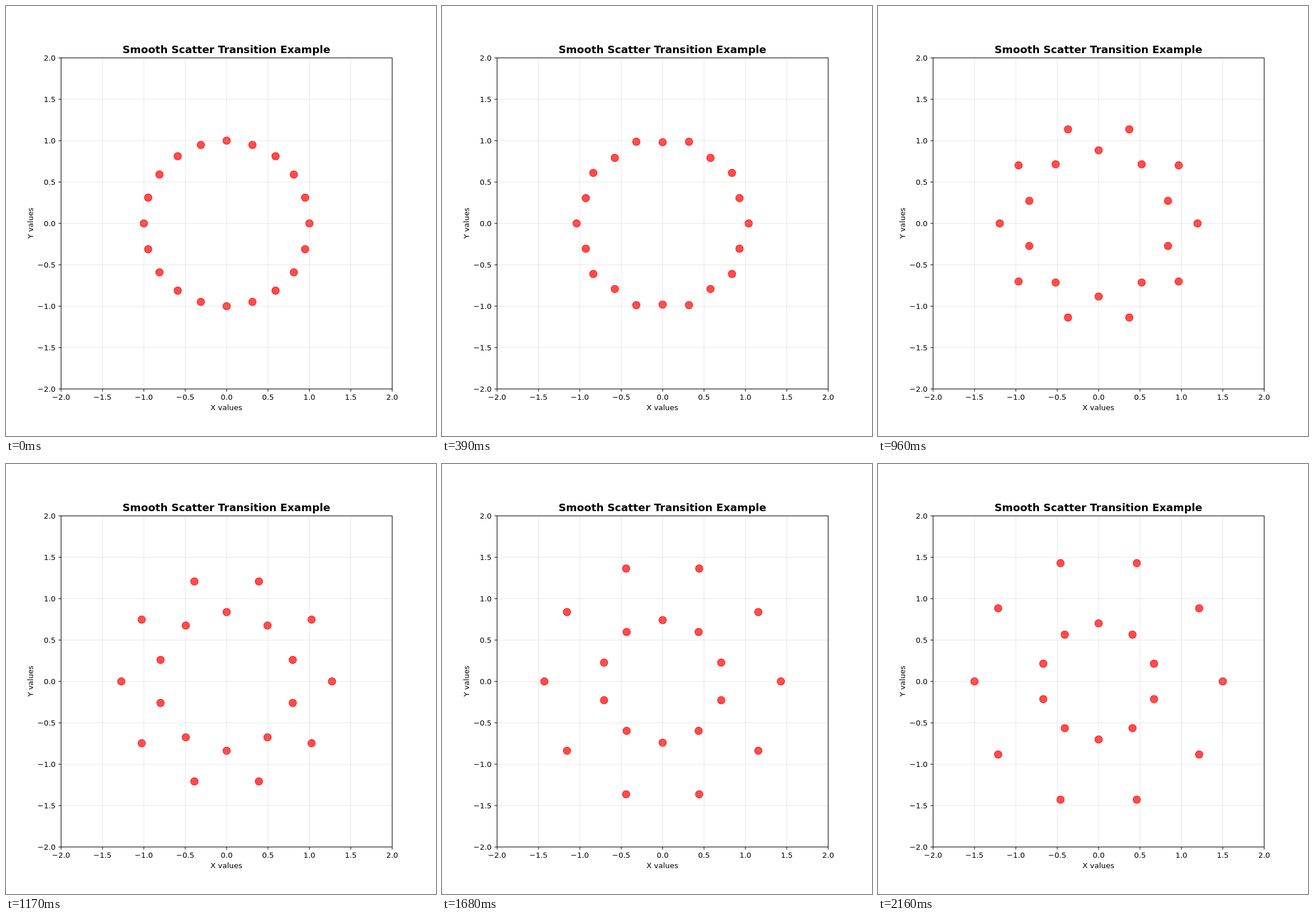
Recreate the animation shown at these times as an HTML page with a canvas. Size 748 by 748 pixels, loop 2.25 s.

```html
<!DOCTYPE html>
<html lang="en">
<head>
<meta charset="utf-8">
<title>Scatter transition</title>
<style>
  html, body { margin: 0; width: 100%; height: 100%; overflow: hidden; background: #fff; }
  canvas { display: block; width: 748px; height: 748px; }
</style>
</head>
<body>
<canvas id="stage" width="748" height="748"></canvas>
<script>
const ctx = document.getElementById('stage').getContext('2d');

// The figure is laid out on an 800-unit square, 100 units per inch.
const SCALE = 748 / 800;
const PT = 100 / 72;
const CX = 410.5, CY = 404.5, UNIT = 154;
const LEFT = 102.5, RIGHT = 718.5, TOP = 96.5, BOTTOM = 712.5;
const STEP_MS = 30, STEPS = 75, POINTS = 20;
const FONT = '"DejaVu Sans", sans-serif';
const ticks = Array.from({ length: 9 }, (_, i) => -2 + i / 2);

function line(x1, y1, x2, y2) {
  ctx.beginPath();
  ctx.moveTo(x1, y1);
  ctx.lineTo(x2, y2);
  ctx.stroke();
}

function text(str, x, y, align = 'center', size = 10, weight = 'normal') {
  ctx.font = `${weight} ${size * PT}px ${FONT}`;
  ctx.textAlign = align;
  ctx.fillText(str, x, y);
}

function drawDots(progress) {
  ctx.fillStyle = ctx.strokeStyle = 'rgba(255, 0, 0, 0.7)';
  ctx.lineWidth = PT;
  for (let i = 0; i < POINTS; i++) {
    const angle = i / POINTS * 2 * Math.PI;
    const reach = i % 2 ? -0.3 : 0.5;
    const r = UNIT * (1 + reach * progress) - 1e-6;
    // Markers sit on whole units.
    const x = Math.floor(CX + r * Math.cos(angle)) + 0.5;
    const y = Math.floor(CY - r * Math.sin(angle)) + 0.5;
    ctx.beginPath();
    ctx.arc(x, y, 5 * PT, 0, 2 * Math.PI);
    ctx.fill();
    ctx.stroke();
  }
}

function drawGrid() {
  ctx.strokeStyle = 'rgba(176, 176, 176, 0.3)';
  ctx.lineWidth = 0.8 * PT;
  for (const v of ticks) {
    line(CX + v * UNIT, TOP, CX + v * UNIT, BOTTOM);
    line(LEFT, CY - v * UNIT, RIGHT, CY - v * UNIT);
  }
}

function drawAxes() {
  ctx.strokeStyle = ctx.fillStyle = '#000';
  ctx.lineWidth = 0.8 * PT;
  ctx.strokeRect(LEFT, TOP, RIGHT - LEFT, BOTTOM - TOP);
  const len = 3.5 * PT;
  for (const v of ticks) {
    const x = CX + v * UNIT, y = CY - v * UNIT;
    const label = v.toFixed(1).replace('-', '\u2212');
    line(x, BOTTOM, x, BOTTOM + len);
    line(LEFT, y, LEFT - len, y);
    text(label, x, 733);
    text(label, 92.3, y + 5, 'right');
  }
}

function drawLabels() {
  text('Smooth Scatter Transition Example', 410, 87.7, 'center', 14, 'bold');
  text('X values', 410, 752.4);
  ctx.save();
  ctx.translate(50, 404);
  ctx.rotate(-Math.PI / 2);
  text('Y values', 0, 0);
  ctx.restore();
}

function draw(ms) {
  const step = Math.floor(ms / STEP_MS) % STEPS;
  const progress = (1 - Math.cos(Math.PI * step / (STEPS - 1))) / 2;
  ctx.setTransform(1, 0, 0, 1, 0, 0);
  ctx.fillStyle = '#fff';
  ctx.fillRect(0, 0, 748, 748);
  ctx.scale(SCALE, SCALE);
  drawDots(progress);
  drawGrid();
  drawAxes();
  drawLabels();
}

const start = performance.now();
function tick() {
  draw(Math.max(0, performance.now() - start));
  requestAnimationFrame(tick);
}
tick();
</script>
</body>
</html>
```
